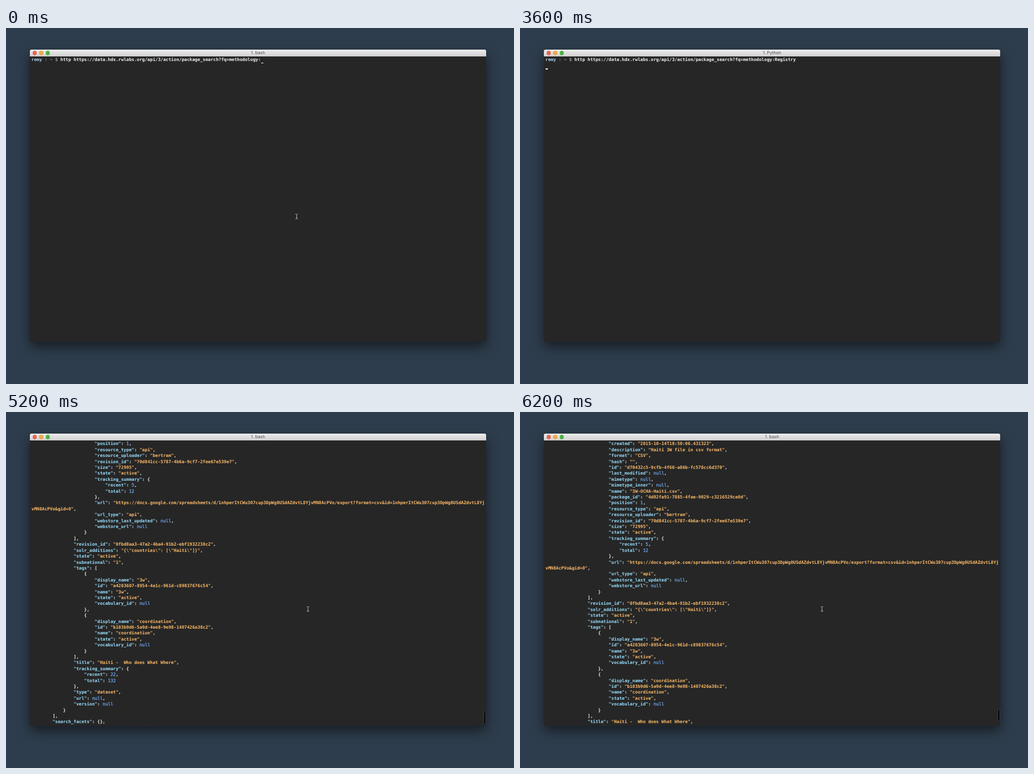
These frames come from a looping animation (894 by 626 pixels, 6300 ms). An HTML page:

```html
<!DOCTYPE html>
<html lang="en">
<head>
<meta charset="utf-8">
<title>Terminal</title>
<style>
  html, body { margin: 0; width: 100%; height: 100%; overflow: hidden; background: #2e3d4d; }
  #win { position: absolute; left: 42px; top: 37.5px; width: 803px; height: 514.5px; border-radius: 3px;
    background: #262626; box-shadow: 0 9px 22px rgba(0,0,0,.53); }
  #bar { height: 12.5px; border-radius: 3px 3px 0 0; background: linear-gradient(#ededed, #d0d0d0);
    font: 7.6px/12.5px Inter, "Liberation Sans", sans-serif; color: #505050; text-align: center;
    text-rendering: geometricPrecision; }
  #bar i { position: absolute; top: 2.7px; width: 7.4px; height: 7.4px; border-radius: 50%; }
  #screen { position: absolute; left: 0; top: 13.5px; width: 803px; height: 501px; overflow: hidden;
    border-radius: 0 0 3px 3px; }
  pre { position: absolute; left: 2.8px; top: .4px; margin: 0; color: #f2f2ee;
    font: bold 7.71px/10.41px "DejaVu Sans Mono", monospace; text-rendering: geometricPrecision;
    font-variant-ligatures: none; }
  .user { color: #acd3f2; }
  .sign { color: #c4c4c4; font-weight: normal; }
  .key { color: #98defd; }
  .str { color: #fdbb69; }
  .num { color: #6fa9f2; font-weight: normal; -webkit-text-stroke: .25px; }
  #caret { position: absolute; width: 4.6px; height: 1.3px; background: #fff; }
  #thumb { position: absolute; left: 797.5px; width: 3.4px; height: 20px; background: #0e0e0e;
    border: .5px solid #3c3c3c; border-radius: 2px; }
  #mouse { position: absolute; width: 7px; height: 11px; fill: none; stroke: #bdbdbd; stroke-width: .9; }
</style>
</head>
<body>
<div id="win">
  <div id="bar">
    <i style="left:4.6px;background:#ec6352"></i>
    <i style="left:16.2px;background:#e8ad50"></i>
    <i style="left:27.8px;background:#4db244"></i>
    <span id="name"></span>
  </div>
  <div id="screen">
    <pre id="text"></pre>
    <div id="caret"></div>
    <div id="thumb"></div>
  </div>
</div>
<svg id="mouse" viewBox="0 0 7 11"><path d="M1.3 1.2Q3.5 1.2 3.5 2.4V8.6Q3.5 9.8 1.3 9.8M5.7 1.2Q3.5 1.2 3.5 2.4M3.5 8.6Q3.5 9.8 5.7 9.8M2.5 7.6H4.5"/></svg>
<script>
const LOOP = 6300, ROW = 10.41, COL = 4.641, LAST_TOP = 16;

const json = String.raw`                        "created": "2015-10-14T18:50:06.431323",
                        "description": "Haiti 3W file in csv format",
                        "format": "CSV",
                        "hash": "",
                        "id": "d70432c5-9cfb-4f60-a86b-fc578cc6d370",
                        "last_modified": null,
                        "mimetype": null,
                        "mimetype_inner": null,
                        "name": "3W-OCHA-Haiti.csv",
                        "package_id": "4d02fa91-7885-4fae-9029-c3216529ce0d",
                        "position": 1,
                        "resource_type": "api",
                        "resource_uploader": "bertram",
                        "revision_id": "70d841cc-5787-4b6a-9cf7-2fee67e539e7",
                        "size": "72995",
                        "state": "active",
                        "tracking_summary": {
                            "recent": 5,
                            "total": 12
                        },
                        "url": "https://docs.google.com/spreadsheets/d/1nhperItCWu307cup3DpWg0USdAZdvtL8YjvMN8AcPVo/export?format=csv&id=1nhperItCWu307cup3DpWg0USdAZdvtL8Yj
vMN8AcPVo&gid=0",
                        "url_type": "api",
                        "webstore_last_updated": null,
                        "webstore_url": null
                    }
                ],
                "revision_id": "0fbd8aa3-47a2-4ba4-91b2-ebf1932238c2",
                "solr_additions": "{\"countries\": [\"Haiti\"]}",
                "state": "active",
                "subnational": "1",
                "tags": [
                    {
                        "display_name": "3w",
                        "id": "a4203607-8954-4e1c-961d-c89837676c54",
                        "name": "3w",
                        "state": "active",
                        "vocabulary_id": null
                    },
                    {
                        "display_name": "coordination",
                        "id": "b103b9d6-5a9d-4ee8-9e98-1407426a38c2",
                        "name": "coordination",
                        "state": "active",
                        "vocabulary_id": null
                    }
                ],
                "title": "Haiti -  Who does What Where",
                "tracking_summary": {
                    "recent": 22,
                    "total": 132
                },
                "type": "dataset",
                "url": null,
                "version": null
            }
        ],
        "search_facets": {},
        "sort": "score desc, metadata_modified desc"
    },
    "success": true
}`;

const $ = id => document.getElementById(id);
const show = (el, on) => el.style.visibility = on ? 'visible' : 'hidden';
const place = (el, x, y) => { el.style.left = x + 'px'; el.style.top = y + 'px'; };

const colour = src => src.replace(/&/g, '&amp;').replace(
  /("(?:\\.|[^"\\])*")(:)?|\b(?:null|true|\d+)\b/g,
  (all, str, colon) => colon ? `<span class="key">${str}</span>:`
    : `<span class="${str ? 'str' : 'num'}">${all}</span>`);

const prompt = '<span class="user">remy</span><span class="sign"> : ~ $ </span>';
const command = 'http https://data.hdx.rwlabs.org/api/3/action/package_search?fq=methodology:';
const output = colour(json) + '\n\n' + prompt;

const word = 'Registry';
const keyTimes = [1300, 1500, 1700, 1800, 2000, 2100, 2300, 2600];
// [time, first visible line]: output runs past, then the user scrolls back
const scroll = [[3700, 0], [4400, LAST_TOP], [4600, LAST_TOP], [4900, 14], [5200, 10], [5800, 5], [6200, 0]];

function topLine(t) {
  const i = scroll.findIndex(p => p[0] >= t);
  if (i < 1) return scroll[0][1];
  const [t0, a] = scroll[i - 1], [t1, b] = scroll[i];
  return Math.round(a + (b - a) * (t - t0) / (t1 - t0));
}

let shown;
function setText(html) {
  if (html !== shown) $('text').innerHTML = shown = html;
}

function draw(t) {
  const printing = t >= 3700, entered = t >= 2800, back = t >= 4600;
  const typed = keyTimes.filter(k => k <= t).length;
  const top = printing ? topLine(t) : 0;

  $('name').textContent = t >= 3300 && t < 4400 ? '1. Python' : '1. bash';
  setText(printing ? output : prompt + command + word.slice(0, typed));
  $('text').style.top = .4 - top * ROW + 'px';

  let col = 11 + command.length + typed, row = 0;
  if (printing) { col = 11; row = 47; }
  else if (entered) { col = 0; row = 1; }
  place($('caret'), 2.8 + col * COL, 9.8 + row * ROW);
  const blinkOff = t >= 900 && t < 1200 || t >= 2600 && !entered;
  show($('caret'), printing ? t >= 4400 && top === LAST_TOP : !blinkOff);

  show($('thumb'), t >= 4700);
  $('thumb').style.top = 478.5 - (LAST_TOP - top) / 2 + 'px';

  show($('mouse'), t < 1200 || back);
  place($('mouse'), back ? 527.6 : 507.8, back ? 341.3 : 326);
}

function tick() {
  draw(Math.floor(performance.now() % LOOP / 100) * 100);
  requestAnimationFrame(tick);
}
tick();
</script>
</body>
</html>
```
